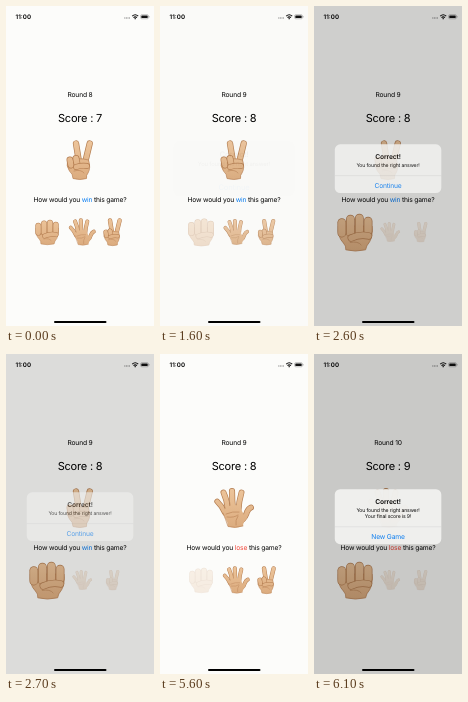
Write an HTML page that moves like this. It is 148 px wide and 320 px high and loops after 8 s.

```html
<!DOCTYPE html>
<html lang="en">
<head>
<meta charset="utf-8">
<title>Hand game</title>
<style>
  html, body { margin: 0; width: 100%; height: 100%; overflow: hidden; background: #fcfcfa; }
  svg { display: block; width: 100vw; height: 100vh; }
  text {
    font: 6.71px Inter, Roboto, sans-serif;
    letter-spacing: -.026em;
    text-anchor: middle;
    text-rendering: geometricPrecision;
  }
  .score { font-size: 11.05px; letter-spacing: -.02em; }
  .clock { font-size: 6.2px; font-weight: 600; letter-spacing: 0; }
  .title { font-weight: 600; }
  .message { font-size: 5.13px; }
  .button { fill: #087cf2; }
  .edge { fill: none; stroke: #b47d50; stroke-linecap: round; stroke-linejoin: round; }
  .skin { fill: none; stroke: url(#tone); stroke-linecap: round; stroke-linejoin: round; }
  .palm { fill: url(#tone); stroke: #bd875b; stroke-width: .8; }
  .crease { fill: none; stroke: #bd875b; stroke-width: .7; stroke-linecap: round; }
</style>
</head>
<body>
<svg viewBox="0 0 148 320">
  <defs>
    <linearGradient id="tone" gradientUnits="userSpaceOnUse" x1="0" y1="-20" x2="0" y2="20">
      <stop offset="0" stop-color="#edc59b"/>
      <stop offset="1" stop-color="#dbab7e"/>
    </linearGradient>
    <g id="rock"></g>
    <g id="paper"></g>
    <g id="scissors"></g>
  </defs>
  <rect width="148" height="320" fill="#fcfcfa"/>

  <text class="clock" x="17.3" y="13.2">11:00</text>
  <path d="M118.3 12H124" stroke="#777" stroke-width="1" stroke-dasharray="1 .6"/>
  <g fill="none" stroke="#111" stroke-width="1.1">
    <path d="M126.2 10.2Q129.2 7.3 132.2 10.2M127.5 11.6Q129.2 10 130.9 11.6"/>
    <path d="M128.6 12.6H129.8"/>
    <rect x="134.6" y="8.7" width="7.8" height="4.1" rx="1.2" stroke="#888" stroke-width=".5"/>
    <path d="M143.1 10V11.5" stroke="#888" stroke-width=".6"/>
  </g>
  <rect x="135.3" y="9.4" width="6.4" height="2.7" rx=".7" fill="#111"/>
  <rect x="48" y="315" width="52.5" height="2" rx="1"/>

  <text id="round" x="74" y="91"></text>
  <text id="score" class="score" x="74" y="115.5"></text>
  <use id="opponent" transform="translate(74 154)"/>
  <text id="question" x="74" y="195.6"></text>
  <use id="pickRock" href="#rock"/>
  <use id="pickPaper" href="#paper"/>
  <use id="pickScissors" href="#scissors"/>

  <rect id="dim" width="148" height="320"/>
  <g id="alert"></g>
</svg>
<script>
const $ = id => document.getElementById(id);
const smooth = x => { x = Math.min(1, Math.max(0, x)); return x * x * (3 - 2 * x); };

// Hands are drawn in a box of 40 units around the origin.
const limb = (d, w) =>
  `<path class="edge" d="${d}" stroke-width="${w + .9}"/><path class="skin" d="${d}" stroke-width="${w - .5}"/>`;
const palm = d => `<path class="palm" d="${d}"/>`;
const crease = d => `<path class="crease" d="${d}"/>`;

$('rock').innerHTML =
  palm('M-17 -6Q-18 5 -12 11Q-9 14 -9.500 18Q0 20.500 10.500 18Q11 14 14.500 10Q18 4 17 -6Z') +
  limb('M-13.500 -9.500V1', 8) + limb('M-4.800 -13V1', 8) +
  limb('M4.200 -14V0', 8) + limb('M13 -11V-1', 8) +
  limb('M13.500 4Q5 2 -4 6', 6.500) +
  crease('M-5 10.500Q3 9 6 13');

$('paper').innerHTML =
  limb('M-9 5Q-12 -2 -16.800 -6.500', 4.800) + limb('M-6 2Q-7 -8 -10.500 -15.500', 5) +
  limb('M-1 1Q-2 -8 -2 -17', 5.200) + limb('M4.500 2Q5 -7 7.500 -15.500', 5) +
  limb('M7 13Q12 9 13 4Q14.500 .5 17 -.5', 5) +
  '<path fill="url(#tone)" d="M-11 4Q-7 -3 0 -3Q6 -3 7.500 2L10 7L13 10Q9 14 9 18Q1 21 -6 18.500Q-6.500 13 -9 10Z"/>' +
  crease('M-8 6Q-1 3 5 4M-7 9Q0 10 4 7M4 8Q1 12 2 17') +
  crease('M-11 5Q-8 12 -6 18.500Q1 20.500 9 18');

$('scissors').innerHTML =
  limb('M-1 2L-4 -16.500', 5.400) + limb('M5 3L9.700 -16.500', 5.400) +
  palm('M-12.500 1Q-2 -3 8.500 0Q11 8 8 13Q6 15 6.500 18.500Q0 20.500 -7 18.500Q-7 14 -10.500 11Q-14 6 -12.500 1Z') +
  limb('M-10 0L-9 5', 6) + limb('M-4 -1.500L-3 4', 6) +
  limb('M7 6Q2 5 -4 7', 5) + crease('M-6 11Q1 9 4 13');

function place(id, x, scale, opacity) {
  $(id).setAttribute('transform', `translate(${x} 226) scale(${scale})`);
  $(id).setAttribute('opacity', opacity);
}

function alertCard(lines, button) {
  const height = 42.5 + 6.2 * lines.length;
  const top = 162.7 - height / 2, bottom = top + height;
  const text = (kind, y, content) => `<text class="${kind}" x="74" y="${y}">${content}</text>`;
  return `<rect x="20.800" y="${top}" width="106.500" height="${height}" rx="5.300" fill="#f1f1ef"/>
    <path d="M20.800 ${bottom - 17.4}H127.300" stroke="#cbcbc9" stroke-width=".4"/>` +
    text('title', top + 14.3, 'Correct!') +
    lines.map((line, i) => text('message', top + 22.4 + i * 6.3, line)).join('') +
    text('button', bottom - 5.5, button);
}

const games = [
  { round: 8, tap: 1500, scored: 1500, hand: 'scissors', goal: 'win', color: '#087cf2',
    card: alertCard(['You found the right answer!'], 'Continue') },
  { round: 9, tap: 5600, scored: 5700, hand: 'paper', goal: 'lose', color: '#f04336',
    card: alertCard(['You found the right answer!', 'Your final score is 9!'], 'New Game') }
];
let current;

function showGame(game) {
  current = game;
  $('opponent').setAttribute('href', '#' + game.hand);
  $('question').innerHTML = `How would you <tspan fill="${game.color}">${game.goal}</tspan> this game?`;
  $('alert').innerHTML = game.card;
}

function draw(t) {
  const game = games[t < 3100 ? 0 : 1];
  if (game !== current) showGame(game);

  const round = game.round + (t >= game.scored);
  $('round').textContent = 'Round ' + round;
  $('score').textContent = 'Score : ' + (round - 1);

  const picked = smooth((t - game.tap) / 350);
  place('pickRock', 41.2, .66 * (1 + .5 * picked), t < game.tap ? 1 : .2 + .8 * picked);
  place('pickPaper', 76.2, .68 * (1 - .27 * picked), 1 - .75 * picked);
  place('pickScissors', 106.8, .7 * (1 - .27 * picked), 1 - .75 * picked);

  const entering = smooth((t - game.tap - 50) / 450);
  const leaving = game === games[0] ? smooth((t - 2500) / 480) : 0;
  const shown = entering * (1 - leaving);
  const grow = 1 + .15 * (1 - entering);
  $('dim').setAttribute('opacity', .205 * shown);
  $('alert').setAttribute('opacity', .97 * shown);
  $('alert').setAttribute('transform', `translate(74 162.7) scale(${grow}) translate(-74 -162.7)`);
}

function tick() {
  draw(Math.floor(performance.now() % 8000 / 100) * 100);
  requestAnimationFrame(tick);
}
tick();
</script>
</body>
</html>
```
